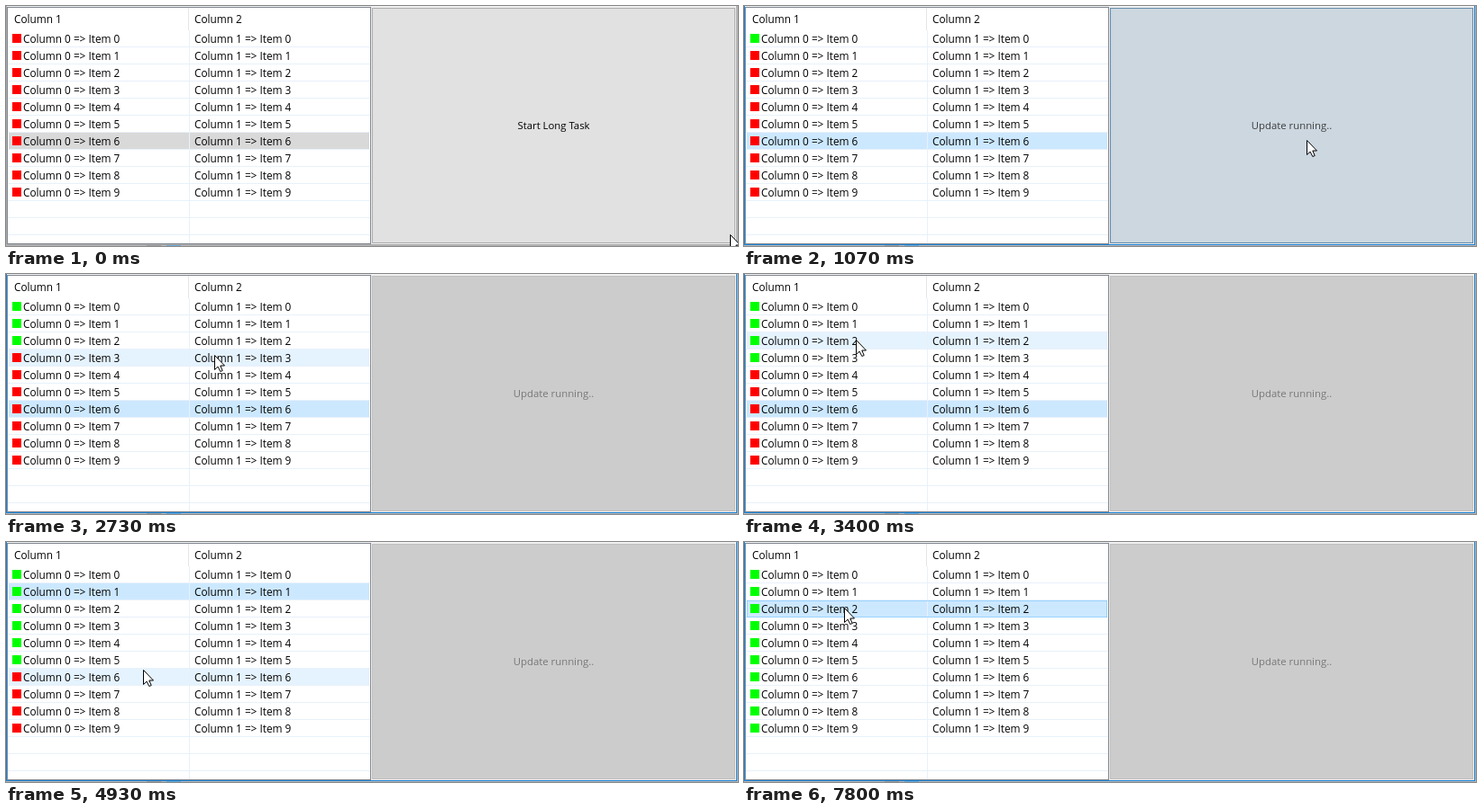
Write an HTML page with a canvas that moves like this. It is 812 by 267 pixels and loops after 8 s.

```html
<!DOCTYPE html>
<html>
<head>
<meta charset="utf-8">
<style>
html, body { margin: 0; width: 812px; height: 267px; overflow: hidden; }
canvas { display: block; }
</style>
</head>
<body>
<canvas id="stage" width="812" height="267"></canvas>
<script>
const ctx = document.getElementById('stage').getContext('2d');
const LOOP = 8000, STEP = 200 / 3;
const ROW_TOP = 27, ROW_H = 19, ITEMS = 10;
const GRID = '#e8f1fa';
const PRESS = 860, RUN = 925;

// Cursor rests: arrival, departure, tip x, tip y
const rests = [
  [0, 0, 803, 254], [800, 2000, 624, 149], [2733, 2733, 231, 90],
  [3533, 3800, 115, 72], [4333, 4467, 113, 62], [4933, 4933, 152, 142],
  [5333, 6200, 126, 110], [6467, 6467, 117, 89], [6600, LOOP, 111, 73]
];
const listClicks = [3720, 4460, 5450, 6850];

const IDLE = { fill: [225, 225, 225], edge: [173, 173, 173], ink: [0, 0, 0] };
const HOT = { fill: [229, 241, 251], edge: [0, 120, 215], ink: [0, 0, 0] };
const PRESSED = { fill: [204, 228, 247], edge: [0, 84, 153], ink: [0, 0, 0] };
const DISABLED = { fill: [204, 204, 204], edge: [191, 191, 191], ink: [120, 120, 120] };

const clamp = v => Math.min(1, Math.max(0, v));
const lerp = (a, b, k) => Math.round(a + (b - a) * k);
const mix = (a, b, k) => `rgb(${a.map((v, i) => lerp(v, b[i], k))})`;
const isDone = (item, t) => t >= 975 + 755 * item;

function rect(x, y, w, h, color) {
  ctx.fillStyle = color;
  ctx.fillRect(x, y, w, h);
}

function frame(x, y, w, h, color) {
  ctx.strokeStyle = color;
  ctx.lineWidth = 1;
  ctx.strokeRect(x + .5, y + .5, w - 1, h - 1);
}

function text(s, x, y, color = '#000', size = 11.8, align = 'left') {
  ctx.font = `${size}px "Open Sans", "Noto Sans", sans-serif`;
  ctx.textAlign = align;
  ctx.fillStyle = color;
  ctx.fillText(s, x, y);
}

function cursorAt(t) {
  const i = rests.findLastIndex(r => r[0] <= t);
  const [, leave, x0, y0] = rests[i];
  const [arrive, , x1, y1] = rests[i + 1] || rests[i];
  if (t <= leave) return [x0, y0];
  const u = clamp((t - leave) / (arrive - leave)), k = u * u * (3 - 2 * u);
  return [lerp(x0, x1, k), lerp(y0, y1, k)];
}

function rowUnder([x, y]) {
  return x < 404 ? Math.floor((y - ROW_TOP) / ROW_H) : -1;
}

function selectedRow(t) {
  const click = listClicks.findLast(c => c <= t);
  return click ? rowUnder(cursorAt(click)) : 6;
}

function drawCursor([x, y]) {
  const outline = [[0, 0], [0, 16], [3.6, 12.6], [6.3, 18], [8.7, 17], [6.3, 11.5], [11, 11.5]];
  ctx.beginPath();
  outline.forEach(([dx, dy]) => ctx.lineTo(x + dx + .5, y + dy + .5));
  ctx.closePath();
  ctx.fillStyle = '#fff';
  ctx.fill();
  ctx.strokeStyle = '#000';
  ctx.lineWidth = 1;
  ctx.stroke();
}

function drawWindow(active) {
  const edge = active ? '#1883d7' : '#aaa';
  rect(0, 0, 812, 267, '#b4b4b4');
  rect(0, 0, 811, 266, '#f0f0f0');
  rect(0, 0, 1, 266, edge);
  rect(810, 0, 1, 266, edge);
  rect(0, 265, 811, 1, edge);
  rect(156, 266, 16, 1, '#999');
  rect(178, 266, 16, 1, '#6aa5cf');
}

function drawItem(i, t, selected, hovered) {
  const top = ROW_TOP + i * ROW_H;
  const active = i === selected, hot = i === hovered;
  if (active) rect(3, top, 400, 18, t < RUN ? '#d9d9d9' : '#cce8ff');
  else if (hot) rect(3, top, 400, 18, '#e5f3ff');
  rect(203, top, 1, 18, GRID);
  if (active && hot) frame(3, top, 400, ROW_H, '#99d1ff');
  rect(7, top + 4, 10, 10, isDone(i, t) ? '#0f0' : '#f00');
  text(`Column 0 => Item ${i}`, 19, top + 14);
  text(`Column 1 => Item ${i}`, 209, top + 14);
}

function drawList(t, cursor) {
  rect(1, 1, 404, 264, '#fff');
  rect(202, 2, 1, 25, '#e5e5e5');
  rect(203, ROW_TOP, 1, 237, GRID);
  text('Column 1', 9, 19);
  text('Column 2', 209, 19);
  for (let y = ROW_TOP + 18; y < 264; y += ROW_H) rect(2, y, 402, 1, GRID);
  const selected = selectedRow(t), hovered = rowUnder(cursor);
  for (let i = 0; i < ITEMS; i++) drawItem(i, t, selected, hovered);
  frame(1, 1, 404, 264, '#828790');
}

function drawButton(t) {
  const running = t >= RUN;
  const [from, to, k] = running ? [PRESSED, DISABLED, (t - RUN) / 270]
    : t >= PRESS ? [PRESSED, PRESSED, 0]
    : [IDLE, HOT, t / 270];
  const color = part => mix(from[part], to[part], clamp(k));
  rect(406, 2, 403, 262, color('fill'));
  frame(406, 2, 403, 262, color('edge'));
  text(running ? 'Update running..' : 'Start Long Task', 607.5, 137, color('ink'), 11.35, 'center');
}

function draw(now) {
  const t = Math.floor((now % LOOP + 5) / STEP) * STEP;
  const cursor = cursorAt(t);
  drawWindow(t >= 790);
  drawList(t, cursor);
  drawButton(t);
  drawCursor(cursor);
}

let start;
function tick(now) {
  start ??= now;
  draw(now - start);
  requestAnimationFrame(tick);
}
requestAnimationFrame(tick);
</script>
</body>
</html>
```
